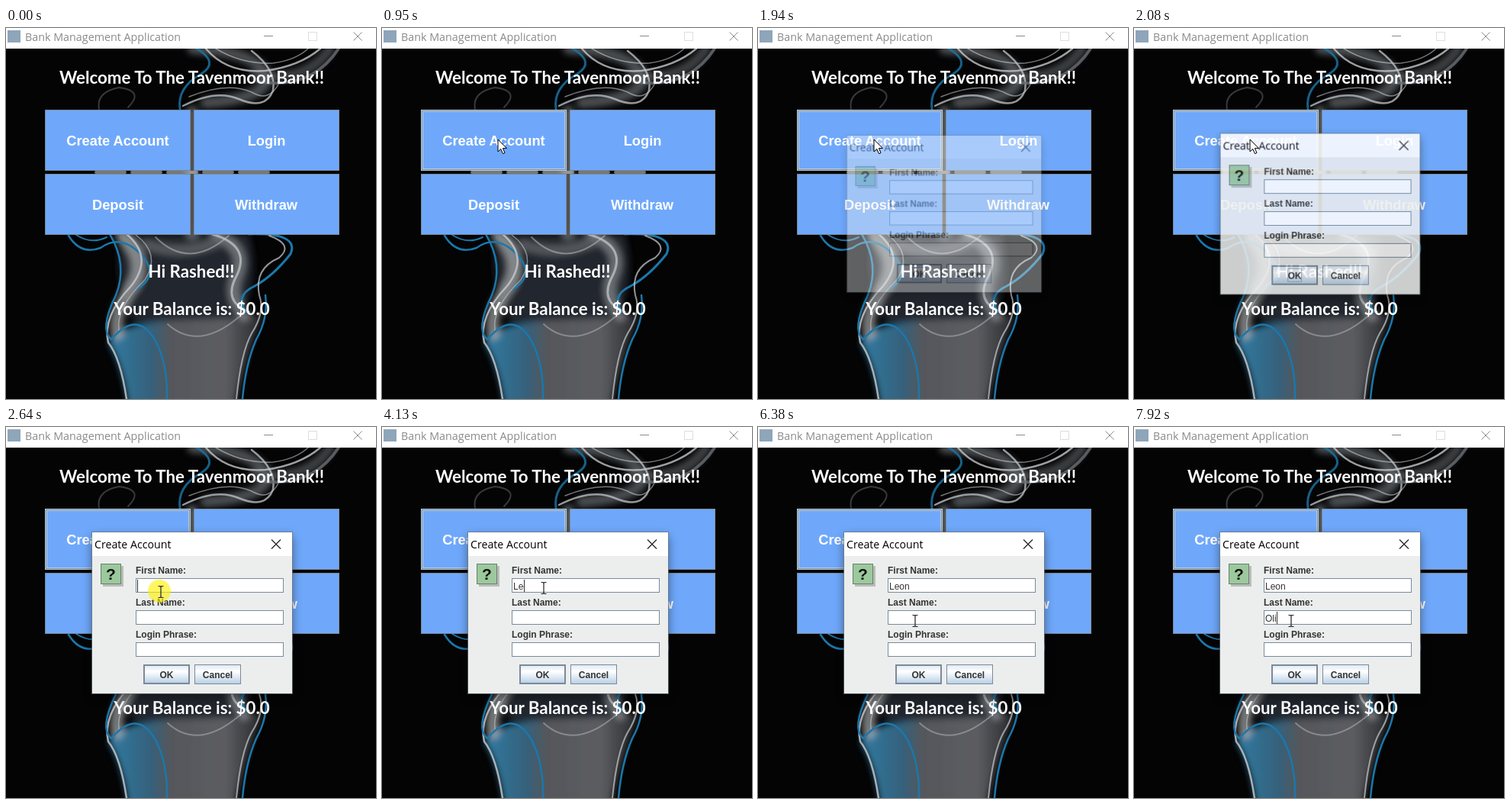
Write an HTML page that moves like this. It is 485x486 px and loops after 8 s.

```html
<!DOCTYPE html>
<html lang="en">
<head>
<meta charset="utf-8">
<title>Bank Management Application</title>
<style>
html, body { margin: 0; width: 100%; height: 100%; overflow: hidden; background: #040405; }
#stage { position: relative; width: 485px; height: 486px; overflow: hidden; }
.layer { position: absolute; left: 0; top: 0; width: 485px; height: 486px; }

.ui { font-family: "Open Sans", "Noto Sans", sans-serif; }
.head { font: 700 22.3px Lato, sans-serif; fill: #fff; text-anchor: middle; }
.tile rect { fill: #6fa8fb; stroke: #7a8a99; }
.tile text { font: 700 18.3px "Liberation Sans", sans-serif; fill: #fff; text-anchor: middle; }
#ring rect { fill: none; stroke: #b8cfe5; }
#ring .dark { stroke: #7a8a99; }
.label { font: 700 12px "Liberation Sans", sans-serif; fill: #333; }
.mid { text-anchor: middle; }
.field { fill: #fff; stroke: #7a8a99; }

.wisp { fill: none; stroke-linecap: round; }
.blue { stroke: #1b78ab; }
.pale { stroke: #c3c6c9; }
.gray { stroke: #6a6e73; }

/* One 8 s timeline: 1% = 80 ms */
.chrome, #ring, #press, #dialog, #cursor, #arrow, #ibeam, #click, #focus, .typed {
  animation: 8s step-end infinite;
}
.chrome { color: #8a8a8a; animation-name: activate; }
#ring { opacity: 0; animation-name: hover; }
#press { opacity: 0; animation-name: press; }
#dialog { opacity: 0; transform-origin: 244px 243px; animation-name: open; }
#focus { animation-name: blur; }
#cursor { animation-name: travel; }
#arrow { opacity: 0; animation-name: arrow; }
#ibeam { opacity: 0; animation-name: ibeam; }
#click { opacity: 0; animation-name: click; }

.typed {
  position: absolute; left: 172px; height: 16px; width: 0; overflow: hidden;
  border-right: 1px solid transparent; white-space: nowrap;
  font: 12px/18px "Liberation Sans", sans-serif; color: #333;
}
#first { top: 200px; animation-name: type1, caret1; }
#last { top: 242px; animation-name: type2, caret2; }

@keyframes activate { 0%, 24.25% { color: #8a8a8a } 22.625% { color: #222 } }
@keyframes hover { 0% { opacity: 0 } 10.125%, 100% { opacity: 1 } }
@keyframes press { 0%, 23.375% { opacity: 0 } 21.75% { opacity: 1 } }
@keyframes open {
  0% { opacity: 0; transform: scale(.95) }
  23.375% { opacity: .15; transform: scale(.955) }
  24.25% { opacity: .4; transform: scale(.971) }
  25.125% { opacity: .68; transform: scale(.987) }
  26% { opacity: .87; transform: scale(.996) }
  26.875%, 100% { opacity: 1; transform: none }
}
@keyframes blur { 0% { opacity: 1 } 32.125%, 100% { opacity: 0 } }
@keyframes travel {
  0%, 4.875% { transform: translate(352px, 435px); animation-timing-function: steps(4) }
  8.375% { transform: translate(205px, 205px); animation-timing-function: steps(4) }
  11.875%, 27.75% { transform: translate(152px, 146px); animation-timing-function: steps(4) }
  31.25%, 34.625% { transform: translate(203px, 216px); animation-timing-function: steps(5) }
  38.875%, 64.125% { transform: translate(212px, 211px); animation-timing-function: steps(3) }
  66.75% { transform: translate(266px, 200px); animation-timing-function: steps(3) }
  69.375% { transform: translate(230px, 242px); animation-timing-function: steps(4) }
  72.875% { transform: translate(204px, 258px); animation-timing-function: steps(2) }
  74.625% { transform: translate(204px, 265px); animation-timing-function: steps(5) }
  78.875%, 100% { transform: translate(206px, 254px) }
}
@keyframes arrow { 0%, 30.375%, 100% { opacity: 0 } 4.875% { opacity: 1 } }
@keyframes ibeam { 0% { opacity: 0 } 30.375%, 100% { opacity: 1 } }
@keyframes click {
  0%, 23.375%, 34.625%, 75.5% { opacity: 0 }
  21.75%, 32.125%, 72.875% { opacity: .62 }
}
@keyframes type1 {
  0% { width: 0 }
  49.125% { width: 7px }
  51.625% { width: 14px }
  55% { width: 20px }
  57.5%, 100% { width: 27px }
}
@keyframes caret1 {
  0%, 39.75%, 63.25%, 73.75%, 100% { border-color: transparent }
  32.125%, 45.75%, 70.25% { border-color: #333 }
}
@keyframes type2 {
  0% { width: 0 }
  92.25% { width: 9px }
  95.75% { width: 12px }
  99%, 100% { width: 15px }
}
@keyframes caret2 {
  0%, 79.75%, 91.375% { border-color: transparent }
  73.75%, 84.75%, 92.25%, 100% { border-color: #333 }
}
</style>
</head>
<body>
<div id="stage">

<svg class="layer" viewBox="0 0 485 486">
  <defs>
    <linearGradient id="plume" x1="0" x2="1" y1="0" y2="0">
      <stop offset="0" stop-color="#2f7ba3"/>
      <stop offset=".28" stop-color="#35607a"/>
      <stop offset=".4" stop-color="#55575b"/>
      <stop offset=".75" stop-color="#5c5d61"/>
      <stop offset="1" stop-color="#26282b"/>
    </linearGradient>
    <linearGradient id="metal" x1="0" x2="0" y1="0" y2="1">
      <stop offset="0" stop-color="#dde8f3"/>
      <stop offset=".35" stop-color="#fff"/>
      <stop offset="1" stop-color="#b8cfe5"/>
    </linearGradient>
    <filter id="soft" x="-20%" y="-20%" width="140%" height="140%"><feGaussianBlur stdDeviation="4"/></filter>
    <filter id="fine" x="-20%" y="-20%" width="140%" height="140%"><feGaussianBlur stdDeviation=".7"/></filter>
    <filter id="shade" x="-20%" y="-20%" width="140%" height="140%"><feGaussianBlur stdDeviation="7"/></filter>
  </defs>

  <rect width="485" height="486" fill="#040405"/>
  <g filter="url(#soft)">
    <path d="M134 412 Q152 388 200 384 Q270 372 338 376 Q318 415 300 495 L160 495 Q152 440 134 412Z" fill="url(#plume)"/>
    <path d="M150 270 Q140 330 168 385 L305 380 Q335 330 318 270Z" fill="#22282d"/>
    <path class="wisp pale" d="M152 272 Q184 300 168 335 Q140 370 146 400" stroke-width="17" opacity=".6"/>
    <path class="wisp pale" d="M275 270 Q318 290 302 325 Q292 352 312 376" stroke-width="15" opacity=".45"/>
    <path class="wisp gray" d="M185 284 Q235 302 285 276" stroke-width="13" opacity=".7"/>
    <path class="wisp gray" d="M245 27 Q325 30 342 62 Q345 92 262 98" stroke-width="15" opacity=".7"/>
    <path class="wisp gray" d="M325 62 Q395 72 425 27" stroke-width="13" opacity=".6"/>
    <path class="wisp gray" d="M244 110 V270" stroke-width="16" opacity=".8"/>
  </g>
  <g filter="url(#fine)">
    <path class="wisp pale" d="M262 27 Q290 60 340 56 Q385 50 412 27" stroke-width="2.500" opacity=".8"/>
    <path class="wisp pale" d="M275 27 Q310 48 350 46 Q380 42 396 27" stroke-width="1.500" opacity=".6"/>
    <path class="wisp pale" d="M232 102 Q275 80 305 93 Q340 108 350 82 Q355 55 322 30" stroke-width="2.500" opacity=".75"/>
    <path class="wisp pale" d="M240 90 Q290 70 322 84 Q345 98 358 72" stroke-width="1.500" opacity=".6"/>
    <path class="wisp gray" d="M330 70 Q400 82 436 27" stroke-width="4" opacity=".8"/>
    <path class="wisp blue" d="M228 106 Q224 78 256 60 Q280 45 250 27" stroke-width="3" opacity=".8"/>
    <path class="wisp gray" d="M122 106 Q118 84 148 78 Q182 82 160 104" stroke-width="2" opacity=".5"/>
    <path class="wisp pale" d="M118 189 H345" stroke-width="4" stroke-dasharray="38 9" opacity=".6"/>

    <path class="wisp blue" d="M82 272 Q98 298 124 288 Q152 268 180 300 Q200 325 172 342" stroke-width="2.500"/>
    <path class="wisp blue" d="M92 271 Q112 284 132 274" stroke-width="2"/>
    <path class="wisp pale" d="M158 270 Q194 300 164 338 Q126 378 134 412 Q150 432 158 486" stroke-width="2.500" opacity=".85"/>
    <path class="wisp pale" d="M170 271 Q204 296 182 330 Q144 366 148 396" stroke-width="1.500" opacity=".6"/>
    <path class="wisp blue" d="M136 270 Q160 310 144 350 Q122 395 138 408 Q172 368 196 410 Q212 440 211 486" stroke-width="2.500"/>
    <path class="wisp pale" d="M196 274 Q240 318 292 272" stroke-width="2" opacity=".5"/>
    <path class="wisp pale" d="M212 388 Q252 424 306 378" stroke-width="2" opacity=".45"/>
    <path class="wisp pale" d="M270 270 Q322 285 302 325 Q284 358 318 372" stroke-width="3" opacity=".75"/>
    <path class="wisp blue" d="M318 270 Q385 268 373 296 Q350 325 326 338 Q300 350 314 372" stroke-width="3"/>
    <path class="wisp pale" d="M345 272 Q378 284 358 301 Q325 315 332 350 Q340 372 322 400 Q308 425 302 486" stroke-width="2" opacity=".75"/>
    <path class="wisp blue" d="M340 350 Q344 380 328 408 Q314 440 310 486" stroke-width="2.500"/>
  </g>

  <rect width="485" height="27" fill="#fff"/>
  <rect x="2" y="3" width="17" height="16" fill="#8fa5ba"/>
  <g class="chrome">
    <text class="ui" x="25" y="17" font-size="14.3" fill="currentColor">Bank Management Application</text>
    <path d="M338 10.500H350M455.500 5.500l11 11m0-11l-11 11" fill="none" stroke="currentColor"/>
  </g>
  <rect x="396.500" y="5.500" width="11" height="11" fill="none" stroke="#dedede"/>

  <text class="head" x="243.500" y="73">Welcome To The Tavenmoor Bank!!</text>
  <text class="head" x="243" y="327">Hi Rashed!!</text>
  <text class="head" x="243.500" y="376">Your Balance is: $0.0</text>

  <g class="tile">
    <rect x="51.500" y="107.500" width="190" height="79"/>
    <rect id="press" x="52" y="108" width="189" height="78" style="fill:#b8cfe5;stroke:none"/>
    <g id="ring">
      <rect x="51.500" y="107.500" width="190" height="79"/>
      <rect class="dark" x="52.500" y="108.500" width="188" height="77"/>
      <rect x="53.500" y="109.500" width="186" height="75"/>
    </g>
    <text x="146.500" y="154">Create Account</text>
  </g>
  <g class="tile"><rect x="246.500" y="107.500" width="190" height="79"/><text x="341.500" y="154">Login</text></g>
  <g class="tile"><rect x="51.500" y="191.500" width="190" height="79"/><text x="146.500" y="238">Deposit</text></g>
  <g class="tile"><rect x="246.500" y="191.500" width="190" height="79"/><text x="341" y="238">Withdraw</text></g>
</svg>

<div id="dialog" class="layer">
  <svg class="layer" viewBox="0 0 485 486">
    <rect x="113" y="143" width="262" height="211" filter="url(#shade)" opacity=".45"/>
    <rect x="113" y="138" width="262" height="211" fill="#eceeee"/>
    <rect x="113" y="138" width="262" height="31" fill="#fff"/>
    <rect x="112.500" y="137.500" width="263" height="212" fill="none" stroke="#707478" opacity=".7"/>
    <text class="ui" x="116" y="159" font-size="14.2">Create Account</text>
    <path d="M348 147.500l12 12m0-12l-12 12" stroke="#222" stroke-width="1.200"/>

    <rect x="127" y="182" width="27" height="27" fill="#b9bdb9"/>
    <rect x="124.500" y="179.500" width="26" height="26" fill="#9cc99c" stroke="#6b7d6b"/>
    <text class="label mid" x="137.500" y="200" style="font-size:21px;fill:#111">?</text>

    <text class="label" x="170" y="192">First Name:</text>
    <text class="label" x="170" y="234">Last Name:</text>
    <text class="label" x="170" y="276">Login Phrase:</text>
    <rect class="field" x="170.500" y="198.500" width="193" height="18"/>
    <rect class="field" x="170.500" y="240.500" width="193" height="18"/>
    <rect class="field" x="170.500" y="282.500" width="193" height="18"/>

    <rect x="181" y="312" width="59" height="24" fill="url(#metal)" stroke="#7a8a99" stroke-width="2"/>
    <rect x="247.500" y="311.500" width="60" height="25" fill="url(#metal)" stroke="#7a8a99"/>
    <rect id="focus" x="201.500" y="315.500" width="18" height="17" fill="none" stroke="#8fa9c8"/>
    <text class="label mid" x="210.500" y="329">OK</text>
    <text class="label mid" x="277.500" y="329">Cancel</text>
  </svg>
  <div id="first" class="typed">Leon</div>
  <div id="last" class="typed">Oli</div>
</div>

<svg class="layer" viewBox="0 0 485 486">
  <g id="cursor">
    <circle id="click" cx="-2" cy="-1" r="15" fill="#fff000"/>
    <path id="arrow" d="M0 0V16L3.800 12.500L6.500 18.700L9 17.600L6.400 11.600H11.500Z" fill="#fff" stroke="#000"/>
    <path id="ibeam" d="M-3.500 -7.500H-1L0 -6.500L1 -7.500H3.500M0 -6.500V6.500M-3.500 7.500H-1L0 6.500L1 7.500H3.500" fill="none" stroke="#222" stroke-width="1.200"/>
  </g>
</svg>

</div>
</body>
</html>
```
